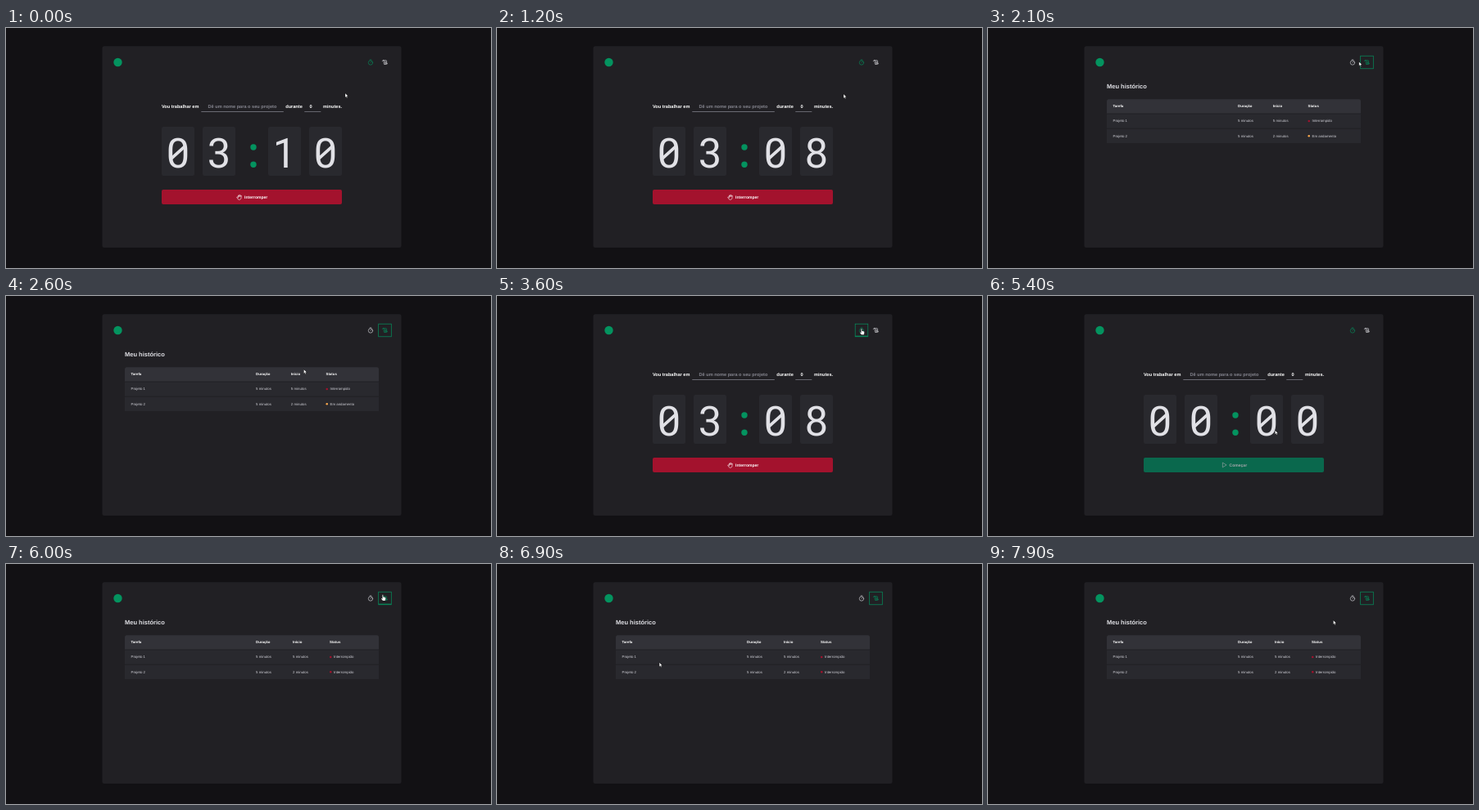
Animation of 592x294 px, one loop 8000 ms. Source, as an HTML page with a canvas:

```html
<!DOCTYPE html>
<html lang="pt-BR">
<head>
<meta charset="utf-8">
<title>Timer</title>
<style>
  html, body { margin: 0; width: 100%; height: 100%; overflow: hidden; background: #121114; }
  canvas { display: block; width: 592px; height: 294px; }
</style>
</head>
<body>
<canvas id="stage"></canvas>
<script>
const W = 592, H = 294, LOOP = 8000, STEP = 100;
const canvas = document.getElementById('stage');
const ctx = canvas.getContext('2d');
const ratio = window.devicePixelRatio || 1;
canvas.width = W * ratio;
canvas.height = H * ratio;

const C = {
  page: '#121114', panel: '#212024', card: '#29292e', head: '#323238',
  label: '#ffffff', text: '#e1e1e6', cell: '#d0d0d7', muted: '#85858f',
  green: '#04935f', greenOff: '#0a684d', red: '#a3122d', redDark: '#730d20', yellow: '#fba94c'
};
const SANS = '"Liberation Sans", Arial, sans-serif';
const DIGITS = 'Roboto, sans-serif';
const NAV = { timer: 445, history: 462.5 };

// Clicks that switch the view or stop the countdown
const OPEN = 2000, BACK = 3500, STOP = 5200, REOPEN = 5800;

// Pointer stops: time and place
const onTimer = [445, 40], onStop = [312, 209], onHistory = [460, 37.5];
const stops = [
  [0, [414, 80]], [1200, [423, 81]], [1600, [473, 54]], [OPEN, onHistory],
  [2600, [363.5, 90]], [3000, [301, 148]], [3300, onTimer], [3600, onTimer],
  [4300, onStop], [STOP, onStop], [REOPEN, onHistory], [6000, onHistory],
  [6700, [159, 112]], [7300, [310, 146]], [7900, [421.5, 69]]
];

function pointerAt(t) {
  const i = Math.max(1, stops.findIndex(s => s[0] >= t));
  const [t0, a] = stops[i - 1], [t1, b] = stops[i];
  const k = (t - t0) / (t1 - t0), e = k * k * (3 - 2 * k);
  return { x: a[0] + (b[0] - a[0]) * e, y: a[1] + (b[1] - a[1]) * e };
}

const inside = (p, x, y, w, h) => p.x >= x && p.x <= x + w && p.y >= y && p.y <= y + h;

function box(x, y, w, h, fill, radius = 0) {
  ctx.fillStyle = fill;
  ctx.beginPath();
  ctx.roundRect(x, y, w, h, radius);
  ctx.fill();
}

function dot(x, y, r, fill) {
  ctx.fillStyle = fill;
  ctx.beginPath();
  ctx.arc(x, y, r, 0, Math.PI * 2);
  ctx.fill();
}

function text(str, x, y, size, fill, weight = 400, align = 'left', family = SANS) {
  ctx.font = `${weight} ${size}px ${family}`;
  ctx.textAlign = align;
  ctx.fillStyle = fill;
  ctx.fillText(str, x, y);
}

function shape(x, y, d, { fill, stroke, width = 0.6 }) {
  const p = new Path2D(d);
  ctx.save();
  ctx.translate(x, y);
  ctx.lineJoin = ctx.lineCap = 'round';
  if (fill) { ctx.fillStyle = fill; ctx.fill(p); }
  if (stroke) { ctx.strokeStyle = stroke; ctx.lineWidth = width; ctx.stroke(p); }
  ctx.restore();
}

const ICON = {
  timer: 'M2.7 .5A2.7 2.7 0 1 1 -2.7 .5A2.7 2.7 0 1 1 2.7 .5M-.9 -3H.9M0 .5L1.2 -.7',
  history: 'M-2.7 -1A.9 .9 0 1 1 -1.2 -1.6V1.6A.8 .8 0 0 0 .4 1.6V1.2H2.9Q3 2.4 2 2.4H-.4' +
    'M-2.1 -2.4H1.2Q2.1 -2.4 2.1 -1.5V1.2M0 -.8H1.1M0 .2H1.1',
  palm: 'M2.4 -1.5V.5C2.4 4 -1 4 -2 2L-3 .2Q-2.5 -.8 -1.2 .8V-2Q-.6 -2.8 0 -2V-.4' +
    'M0 -2Q.6 -3.4 1.2 -2V-.4M1.2 -1.5Q1.8 -2.4 2.4 -1.5',
  play: 'M-1.8 -2.7L2.6 0L-1.8 2.7Z',
  arrow: 'M0 0V5L1.2 3.9L2 5.7L2.8 5.3L2 3.6H3.6Z',
  hand: 'M-.7 .6Q0 -.7 .5 .6V2.7L2.7 3.2Q3.6 3.5 3.5 4.5L3 7.6H-.1L-2 5.2Q-2.2 3.8 -.7 4.8Z'
};

function drawNav(page, focus, p) {
  dot(136.5, 42, 5.2, C.green);
  let hover = false;
  for (const name in NAV) {
    const cx = NAV[name], left = cx - 7.5;
    shape(cx, 42, ICON[name], { stroke: page === name ? C.green : C.text });
    if (focus === name) {
      ctx.strokeStyle = C.green;
      ctx.lineWidth = 0.7;
      ctx.strokeRect(left - 0.3, 34.2, 15.6, 15.6);
    }
    if (inside(p, left, 34.5, 15, 15)) {
      hover = true;
      box(left, 48.7, 15, 1, C.green);
    }
  }
  return hover;
}

function drawDigit(ch, x) {
  box(x, 121, 40, 60, C.card, 2.5);
  text(ch, x + 20, 170.5, 50.5, C.text, 400, 'center', DIGITS);
  if (ch === '0') {
    shape(x + 20, 152.5, 'M-7.6 6.8L7.6 -6.8', { stroke: C.text, width: 3.8 });
  }
}

// The count holds its last value while the view is closed and for one second after
function timeLeft(t) {
  if (t >= STOP) return '0000';
  const seen = t < BACK + 1000 ? Math.min(t, OPEN) : t;
  return '03' + String(10 - Math.floor((seen + 800) / 1000)).padStart(2, '0');
}

function drawField(x, w) {
  box(x, 102.3, w, 0.7, C.muted);
}

function drawTimer(t, p) {
  const label = (s, x) => text(s, x, 98.3, 5.625, C.label, 700);
  label('Vou trabalhar em', 190);
  text('Dê um nome para o seu projeto', 288.4, 98.2, 5.625, C.muted, 700, 'center');
  drawField(238.3, 100.5);
  label('durante', 341.2);
  label('0', 370.4);
  drawField(364.3, 20);
  label('minutes.', 387);

  [...timeLeft(t)].forEach((ch, i) => drawDigit(ch, 190 + 50 * i + (i > 1 ? 30 : 0)));
  dot(302, 146, 3.7, C.green);
  dot(302, 167.2, 3.7, C.green);

  const stopped = t >= STOP;
  const hover = !stopped && inside(p, 190, 198, 220, 18);
  box(190, 198, 220, 18, stopped ? C.greenOff : hover ? C.redDark : C.red, 2);
  const ink = stopped ? '#a7a7ac' : C.label;
  shape(stopped ? 288.5 : 284.7, 207, stopped ? ICON.play : ICON.palm, { stroke: ink });
  text(stopped ? 'Começar' : 'Interromper', stopped ? 294.5 : 291, 208.7, 5.05, ink, 700);
  return hover;
}

function drawHistory(done) {
  text('Meu histórico', 145, 73.8, 7.5, C.text, 700);
  box(145, 87.2, 310, 17.2, C.head, [2.5, 2.5, 0, 0]);
  const gap = done ? 45 : 42.75;
  const col = i => i ? 305 + gap * (i - 1) : 152.5;
  ['Tarefa', 'Duração', 'Início', 'Status'].forEach((s, i) => text(s, col(i), 97.3, 4.375, C.label, 700));

  const rows = [
    ['Projeto 1', '5 minutos', '5 minutos', true],
    ['Projeto 2', '5 minutos', '2 minutos', done]
  ];
  rows.forEach(([task, length, start, ended], i) => {
    const y = 105.6 + i * 18.2;
    box(145, y, 310, 17.1, C.card);
    [task, length, start].forEach((s, n) => text(s, col(n), y + 9.8, 4.375, C.cell));
    dot(col(3) + 1.25, y + 8.5, 1.25, ended ? C.red : C.yellow);
    text(ended ? 'Interrompido' : 'Em andamento', col(3) + 5, y + 9.8, 4.375, C.cell);
  });
}

function draw(t) {
  const page = (t >= OPEN && t < BACK) || t >= REOPEN ? 'history' : 'timer';
  const focus = t < OPEN || (t >= STOP && t < REOPEN) ? null : page;
  const p = pointerAt(t);

  ctx.setTransform(ratio, 0, 0, ratio, 0, 0);
  ctx.textRendering = 'geometricPrecision';
  box(0, 0, W, H, C.page);
  box(117.5, 22.2, 365, 246.8, C.panel, 2.5);

  let hover = drawNav(page, focus, p);
  if (page === 'timer') hover = drawTimer(t, p) || hover;
  else drawHistory(t >= STOP);
  shape(p.x, p.y, hover ? ICON.hand : ICON.arrow, { fill: '#fff', stroke: '#000', width: 0.3 });
}

function tick(now) {
  draw(Math.floor((now % LOOP) / STEP) * STEP);
  requestAnimationFrame(tick);
}
requestAnimationFrame(tick);
</script>
</body>
</html>
```
